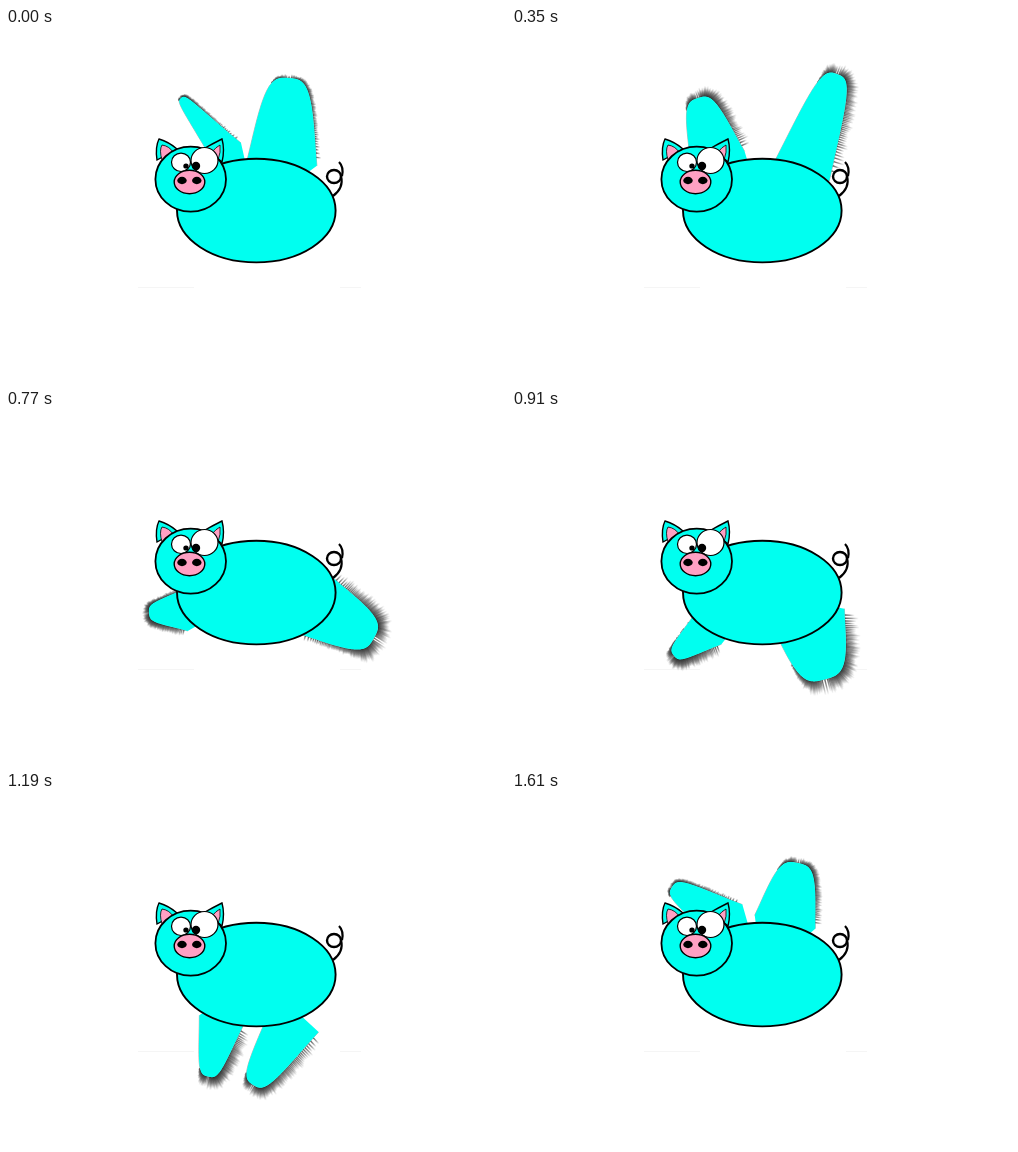
Animation, 500 px wide and 354 px high, one loop 1680 ms. Source, as an HTML page with a canvas:

```html
<!DOCTYPE html>
<html lang="en">
<head>
<meta charset="utf-8">
<title>Flapping pig</title>
<style>
html, body { margin: 0; width: 100%; height: 100%; overflow: hidden; background: #fff; }
canvas { display: block; }
</style>
</head>
<body>
<canvas id="stage" width="500" height="354"></canvas>
<script>
const ctx = document.getElementById('stage').getContext('2d');
const STEP_MS = 70, STEPS = 24;
const CYAN = '#00fff0', PINK = '#ffa0c3', INK = '#000', WHITE = '#fff';
const BODY = { x: 250.3, y: 182.6, rx: 79.3, ry: 51.8 };

// A wing is a rounded blade from root to tip, keyed at a few steps of the flap.
const pose = (step, rootX, rootY, tipX, tipY, width) =>
  ({ step, rootX, rootY, tipX, tipY, width });

const rightWing = [
  pose(0, 276, 135, 283, 50, 26),
  pose(5, 290, 143, 325, 46, 20),
  pose(8, 312, 148, 361, 86, 13),
  pose(11, 309, 195, 368, 228, 24),
  pose(15, 286, 215, 258, 287, 28),
  pose(19, 294, 222, 254, 267, 9),
  pose(23, 273, 130, 286, 71, 22)
];
const leftWing = [
  pose(0, 222, 126, 175, 70, 8),
  pose(5, 206, 132, 186, 70, 19),
  pose(8, 188, 130, 150, 112, 8),
  pose(11, 180, 200, 143, 203, 12),
  pose(15, 214, 225, 184, 273, 11),
  pose(19, 213, 218, 209, 266, 16),
  pose(23, 218, 132, 160, 95, 14)
];

const noise = n => {
  const s = Math.sin(n * 127.1 + 3.7) * 43758.5453;
  return s - Math.floor(s);
};

// Smooth cyclic path through the key poses.
function poseAt(keys, step) {
  const count = keys.length;
  const key = k => keys[(k + count) % count];
  const time = k => key(k).step + STEPS * Math.floor(k / count);
  let k = count - 1;
  while (keys[k].step > step) k--;
  const span = time(k + 1) - time(k), t = (step - time(k)) / span, u = 1 - t;
  const slope = (k, name) =>
    (key(k + 1)[name] - key(k - 1)[name]) / (time(k + 1) - time(k - 1)) * span;
  const value = name =>
    key(k)[name] * u * u * (1 + 2 * t) + key(k + 1)[name] * t * t * (3 - 2 * t) +
    slope(k, name) * t * u * u - slope(k + 1, name) * t * t * u;

  const x = value('rootX'), y = value('rootY');
  const dx = value('tipX') - x, dy = value('tipY') - y;
  return { x, y, dx, dy, length: Math.hypot(dx, dy) || 1, width: value('width') };
}

// Outline point for u from -1 (one side of the root) over the tip to 1.
function edgePoint(wing, u) {
  const angle = u * Math.PI / 2;
  const along = Math.pow(Math.max(0, Math.cos(angle)), .6);
  const flare = wing.width + 9 * Math.pow(1 - along, 1.5);
  const across = Math.sign(u) * Math.pow(Math.abs(Math.sin(angle)), .6) * flare / wing.length;
  return [
    wing.x + wing.dx * along - wing.dy * across,
    wing.y + wing.dy * along + wing.dx * across
  ];
}

// Fur leans toward the tip and the right, and is longest in mid-flap.
function drawFur(wing, step) {
  const longest = 13 * Math.sqrt(Math.sin(Math.PI * (step + 1) / (STEPS + 2)));
  const leanX = wing.dx / wing.length + .8, leanY = wing.dy / wing.length;
  const hairs = 150;
  ctx.lineWidth = 1.4;
  for (let i = 1; i < hairs; i++) {
    const u = 2 * i / hairs - 1;
    const [x, y] = edgePoint(wing, u);
    const [x0, y0] = edgePoint(wing, u - .01);
    const [x1, y1] = edgePoint(wing, u + .01);
    const d = Math.hypot(x1 - x0, y1 - y0) || 1;
    const nx = (y1 - y0) / d, ny = (x0 - x1) / d;
    const exposure = Math.min(1, .35 + .65 * (nx * leanX + ny * leanY));
    const reach = longest * exposure * (.75 + .45 * noise(i + step * 13));
    if (reach < 1.5) continue;
    const endX = x + nx * reach, endY = y + ny * reach + 1;
    const fade = ctx.createLinearGradient(x, y, endX, endY);
    fade.addColorStop(0, 'rgba(50,50,50,.8)');
    fade.addColorStop(.5, 'rgba(85,85,85,.55)');
    fade.addColorStop(1, 'rgba(130,130,130,0)');
    ctx.strokeStyle = fade;
    ctx.beginPath();
    ctx.moveTo(x, y);
    ctx.lineTo(endX, endY);
    ctx.stroke();
  }
}

function drawWing(keys, step) {
  const wing = poseAt(keys, step);
  drawFur(wing, step);
  ctx.beginPath();
  for (let i = -50; i <= 50; i++) ctx.lineTo(...edgePoint(wing, i / 50));
  ctx.strokeStyle = 'rgba(0,0,0,.4)';
  ctx.lineWidth = .7;
  ctx.stroke();
  ctx.lineTo(BODY.x, BODY.y);
  ctx.fillStyle = CYAN;
  ctx.fill();
}

function paint(path, fill, width) {
  if (fill) {
    ctx.fillStyle = fill;
    ctx.fill(path);
  }
  if (width) {
    ctx.strokeStyle = INK;
    ctx.lineWidth = width;
    ctx.stroke(path);
  }
}

const shape = (data, fill, width) => paint(new Path2D(data), fill, width);

function oval(x, y, rx, ry, fill, width) {
  const path = new Path2D();
  path.ellipse(x, y, rx, ry, 0, 0, Math.PI * 2);
  paint(path, fill, width);
}

function drawTail() {
  shape('M318 154L335 146Q338 158 327 169Z', WHITE);
  oval(328, 148.5, 7, 6.5, WHITE, 2.4);
  shape('M333 134Q338 139 336 148M335 148Q338 160 327 168', null, 2.2);
}

function drawHead() {
  shape('M151 132Q149 119 153 111Q163 114 171 121Z', CYAN, 1.4);
  shape('M199 120Q208 115 216 111Q219 122 216 134Z', CYAN, 1.4);
  shape('M156 132Q153 122 156 117Q163 118 167 124Z', PINK, .8);
  shape('M212 132Q215 124 214 117Q210 119 206 124Z', PINK, .8);
  oval(184.7, 151.2, 35.3, 32.5, CYAN, 1.8);
  oval(175, 134.3, 9.5, 9.2, WHITE, 1.2);
  oval(198.5, 132.5, 13.5, 13, WHITE, 1.2);
  oval(180, 138, 2.7, 2.6, INK);
  oval(190, 138, 4.2, 4.2, INK);
  oval(183.5, 154, 15.3, 11.7, PINK, 1.4);
  for (const x of [176, 190.8]) oval(x, 152.5, 4.7, 3.7, INK);
}

function draw(step) {
  ctx.fillStyle = WHITE;
  ctx.fillRect(0, 0, 500, 354);
  ctx.fillStyle = '#f5f5f5';
  ctx.fillRect(132, 259, 56, 1);
  ctx.fillRect(334, 259, 21, 1);
  drawWing(leftWing, step);
  drawWing(rightWing, step);
  drawTail();
  oval(BODY.x, BODY.y, BODY.rx, BODY.ry, CYAN, 1.9);
  drawHead();
}

const start = performance.now();
function tick() {
  draw(Math.floor((performance.now() - start) / STEP_MS) % STEPS);
  requestAnimationFrame(tick);
}
tick();
</script>
</body>
</html>
```
